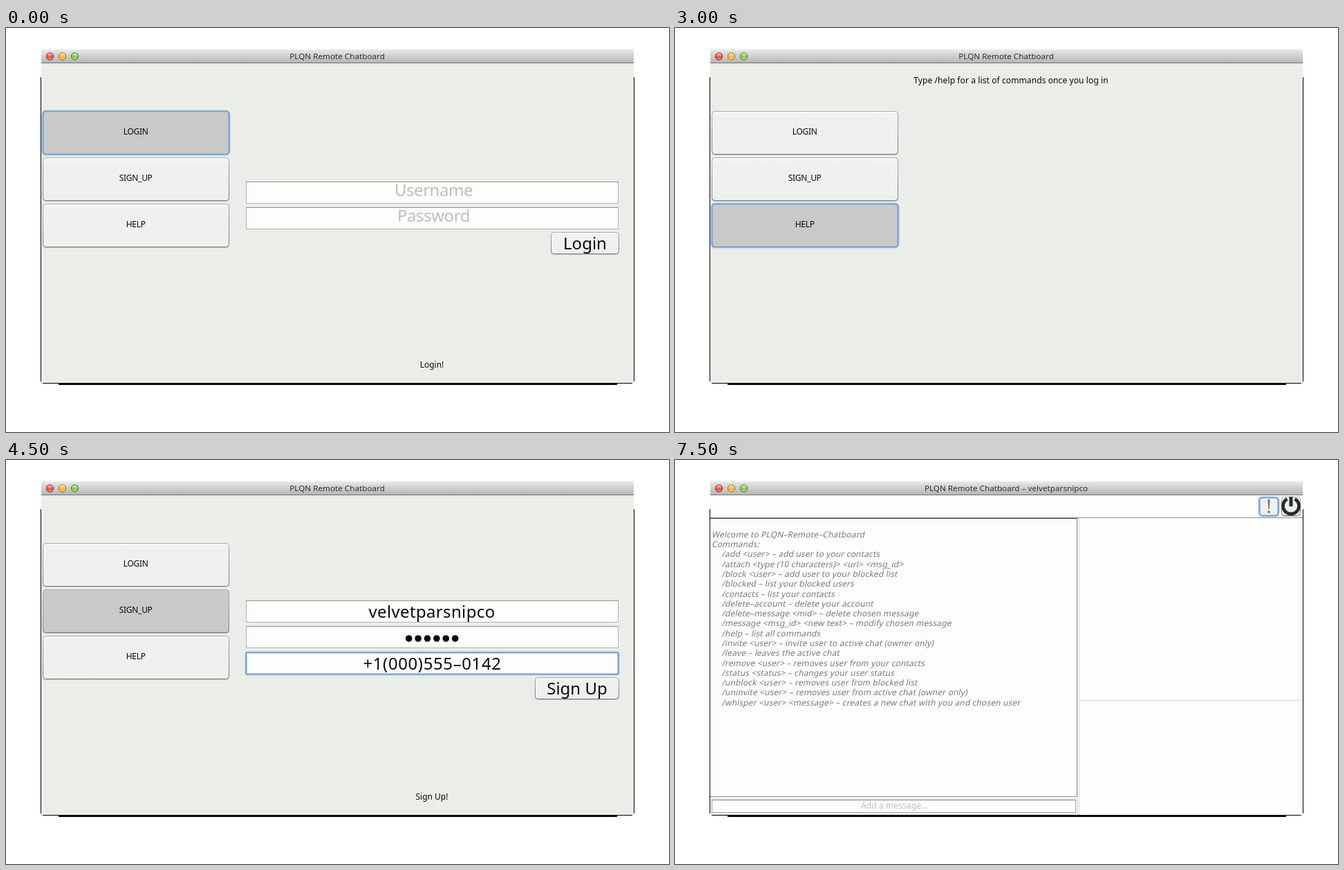
Recreate the animation shown at these times as an HTML page. Size 959x584 px, loop 8 s.

```html
<!DOCTYPE html>
<html lang="en">
<head>
<meta charset="utf-8">
<title>Messenger walkthrough</title>
<style>
  html, body { margin: 0; width: 100%; height: 100%; overflow: hidden; background: #fff; }
  svg { display: block; width: 959px; height: 584px; }
  text { font-family: "Noto Sans", "Open Sans", sans-serif; font-size: 12px; fill: #0a0a0a; white-space: pre; }
  .note { letter-spacing: .1px; }
  .title { font-size: 11.6px; letter-spacing: .05px; fill: #2e2e2e; }
  .menu { letter-spacing: -.3px; }
  .large { font-size: 24px; }
  .hint { font-size: 24px; letter-spacing: -.45px; fill: #bcbebb; }
  .entry { font-size: 24px; letter-spacing: .35px; }
  .phone { font-size: 24px; letter-spacing: .6px; }
  .log { letter-spacing: .14px; fill: #797a78; }
  .faint { letter-spacing: .1px; fill: #bcbebb; }
  .mark { font-family: "Noto Serif", serif; font-size: 27px; fill: #747674; }
</style>
</head>
<body>
<svg id="stage" viewBox="0 0 959 584">
  <defs>
    <linearGradient id="bar" x2="0" y2="1"><stop stop-color="#e8eae7"/><stop offset="1" stop-color="#b2b4b1"/></linearGradient>
    <linearGradient id="face" x2="0" y2="1"><stop stop-color="#f4f6f3"/><stop offset=".15" stop-color="#eff1ee"/><stop offset="1" stop-color="#eef0ed"/></linearGradient>
    <linearGradient id="edge" x2="0" y2="1"><stop stop-color="#a9aba8"/><stop offset="1" stop-color="#777976"/></linearGradient>
    <linearGradient id="gloss" x2="0" y2="1"><stop stop-color="#fff" stop-opacity=".75"/><stop offset=".6" stop-color="#fff" stop-opacity="0"/><stop offset="1" stop-color="#fff" stop-opacity=".45"/></linearGradient>
  </defs>
</svg>
<script>
const LOOP = 8000;
const APP = "PLQN Remote Chatboard";
const USER = "velvetparsnipco";
const PHONE = "+1(000)555–0142";
const stage = document.getElementById("stage");

function add(parent, tag, attrs = {}, content = "") {
  const el = document.createElementNS("http://www.w3.org/2000/svg", tag);
  for (const key in attrs) el.setAttribute(key, attrs[key]);
  el.textContent = content;
  parent.append(el);
  return el;
}

const rect = (g, x, y, width, height, fill, more) => add(g, "rect", { x, y, width, height, fill, ...more });
const circle = (g, cx, cy, r, fill, more) => add(g, "circle", { cx, cy, r, fill, ...more });
const label = (g, x, y, text, style = "", anchor = "middle") =>
  add(g, "text", { x, y, class: style, "text-anchor": anchor }, text);

function focusRing(g, x, y, w, h, rx) {
  rect(g, x - .5, y - .5, w + 1, h + 1, "none", { rx: rx + 1, stroke: "#a9c6ea", "stroke-width": 3 });
  rect(g, x, y, w, h, "none", { rx, stroke: "#6c9bd6", "stroke-width": 1.7 });
}

function button(g, x, y, w, h, { selected, focused } = {}) {
  rect(g, x + .5, y + 1.3, w - 1, h - 1, "none", { rx: 4, stroke: "#bdbfbc" });
  rect(g, x + .5, y + .5, w - 1, h - 1, selected ? "#c8cac7" : "url(#face)", { rx: 4, stroke: "url(#edge)" });
  if (!selected) rect(g, x + 4, y + 1, w - 8, 1, "#fbfdfa");
  if (focused) focusRing(g, x + .5, y + .5, w - 1, h - 1, 4);
}

function titleBar(g, text) {
  rect(g, 51, 31, 857, 20, "url(#bar)");
  rect(g, 51, 50, 857, 1, "#747673");
  [["#e9483f", "#9c2f2b"], ["#f4b23a", "#a06f1c"], ["#84c34c", "#4b7d25"]].forEach(([fill, stroke], i) => {
    const x = 63.5 + i * 18;
    circle(g, x, 41, 5.2, fill, { stroke });
    circle(g, x, 41, 4.4, "url(#gloss)");
  });
  label(g, 479, 45, text, "title");
}

function menu(g, chosen, focused) {
  ["LOGIN", "SIGN_UP", "HELP"].forEach((text, i) => {
    const y = 120 + 67 * i;
    const selected = i === chosen;
    button(g, 53, y, 270, 63, { selected, focused: selected && focused });
    label(g, 187.7, y + 34.4, text, "menu");
  });
}

function field(g, y, focused) {
  rect(g, 347.5, y + .5, 538, 31, "#fdfefc", { stroke: "#b0b2af" });
  rect(g, 347, y, 539, 1, "#8f918e");
  if (focused) focusRing(g, 347.5, y + .5, 538, 31, 1);
}

function hintField(g, y, text) {
  field(g, y);
  label(g, 618.5, y + 21.3, text, "hint");
}

function submit(g, x, y, text, status) {
  button(g, x, y, 887 - x, 32);
  label(g, (x + 887) / 2, y + 24.8, text, "large");
  label(g, 616, 491, status);
}

function panel(g, chosen, focused = true) {
  rect(g, 51, 51, 857, 462, "#ebede9");
  titleBar(g, APP);
  menu(g, chosen, focused);
}

function loginScene(g) {
  panel(g, 0);
  hintField(g, 222, "Username");
  hintField(g, 259, "Password");
  submit(g, 788, 295, "Login", "Login!");
}

function signUpScene(g) {
  panel(g, 1);
  ["Username", "Password", "Phone Number"].forEach((text, i) => hintField(g, 203 + Math.round(37.4 * i), text));
  submit(g, 765, 314, "Sign Up", "Sign Up!");
}

function helpScene(g) {
  panel(g, 2);
  label(g, 486, 80, "Type /help for a list of commands once you log in", "note");
}

const filledScene = (user, focusedField) => g => {
  panel(g, 1, false);
  [203, 240, 278].forEach((y, i) => field(g, y, i === focusedField));
  label(g, 616, 228, user, "entry");
  for (let i = 0; i < 6; i++) circle(g, 582.7 + 13.4 * i, 258, 4.8, "#0a0a0a");
  label(g, 616.5, 303, PHONE, "phone");
  submit(g, 765, 314, "Sign Up", "Sign Up!");
};

const COMMANDS = `/add <user> – add user to your contacts
/attach <type (10 characters)> <url> <msg_id>
/block <user> – add user to your blocked list
/blocked – list your blocked users
/contacts – list your contacts
/delete–account – delete your account
/delete–message <mid> – delete chosen message
/message <msg_id> <new text> – modify chosen message
/help – list all commands
/invite <user> – invite user to active chat (owner only)
/leave – leaves the active chat
/remove <user> – removes user from your contacts
/status <status> – changes your user status
/unblock <user> – removes user from blocked list
/uninvite <user> – removes user from active chat (owner only)
/whisper <user> <message> – creates a new chat with you and chosen user`.split("\n");

function chatScene(g) {
  rect(g, 51, 51, 857, 462, "#fdfefc");
  titleBar(g, `${APP} – ${USER}`);
  rect(g, 51, 83, 857, 1, "#8b8d8a");

  button(g, 845, 54, 28, 27, { focused: true });
  label(g, 859, 77, "!", "mark");
  button(g, 877, 53, 28, 28);
  add(g, "path", { d: "M885.5 56.4A11.5 11.5 0 1 0 896.5 56.4", fill: "none", stroke: "#2b2c2b", "stroke-width": 4.8 });
  rect(g, 888.5, 53, 5, 14, "#2b2c2b");

  rect(g, 582, 84, 4, 429, "#ecedea");
  rect(g, 586, 346, 322, 3, "#ecedea");
  rect(g, 51, 488, 531, 25, "#ebede9");
  rect(g, 50.5, 84.5, 531, 402, "#fdfefc", { stroke: "#8b8d8a" });
  rect(g, 51, 84, 531, 1, "#4a4b4a");

  const products = APP.replaceAll(" ", "–");
  [`Welcome to ${products}`, "Commands:", ...COMMANDS].forEach((line, i) => {
    const x = i < 2 ? 53 : 67.5;
    const text = label(g, 0, 0, line, "log", "start");
    text.setAttribute("transform", `translate(${x} ${111.8 + 14.29 * i}) skewX(-12)`);
  });

  rect(g, 53.5, 491.5, 526, 18, "#fdfefc", { stroke: "#a4a6a3" });
  rect(g, 53, 491, 527, 1, "#858784");
  label(g, 317.5, 504, "Add a message...", "faint");
}

const SCENES = [
  [0, loginScene],
  [1500, signUpScene],
  [3000, helpScene],
  [4500, filledScene(USER, 2)],
  [6000, filledScene("lufide", 0)],
  [7500, chatScene],
];

// Every scene is opaque: each one covers those before it until the loop restarts
SCENES.forEach(([start, draw]) => {
  const layer = add(stage, "g");
  draw(layer);
  if (start === 0) return;
  const offset = start / LOOP;
  layer.animate(
    [{ opacity: 0, offset: 0 }, { opacity: 0, offset }, { opacity: 1, offset }, { opacity: 1, offset: 1 }],
    { duration: LOOP, iterations: Infinity }
  );
});

// Window outline shared by every scene
rect(stage, 50, 71, 1, 440, "#000");
rect(stage, 908, 71, 1, 440, "#000");
rect(stage, 53, 513, 853, 1, "#000");
rect(stage, 76, 514, 808, 2, "#000");
</script>
</body>
</html>
```
